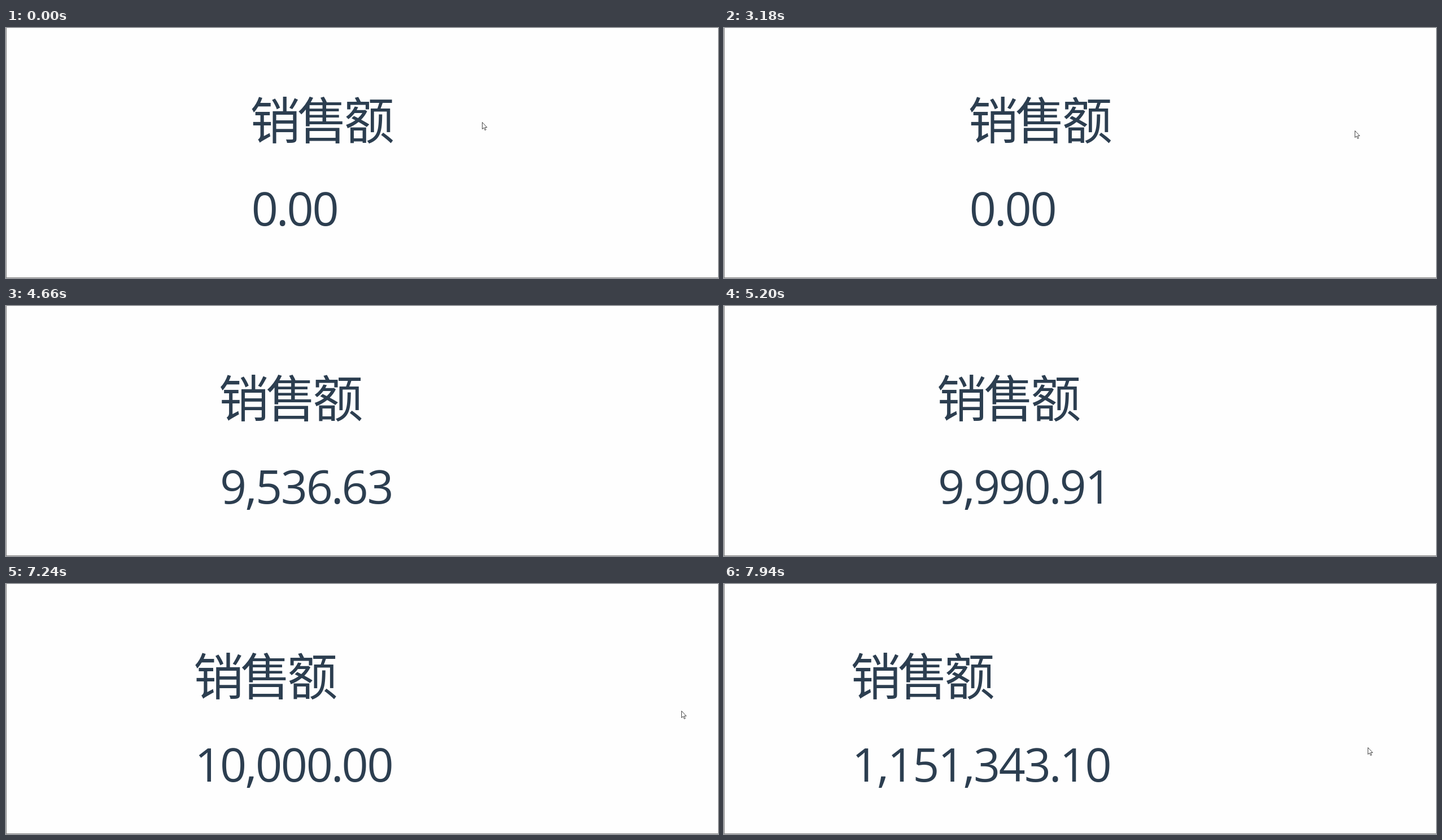
Animation of 1261 by 444 pixels, one loop 8000 ms. Source, as an HTML page with a canvas:

```html
<!DOCTYPE html>
<html lang="zh-CN">
<head>
<meta charset="utf-8">
<title>销售额</title>
<style>
html, body { margin: 0; width: 100%; height: 100%; overflow: hidden; background: #fefefe; }
canvas { display: block; }
</style>
</head>
<body>
<canvas id="stage" width="1261" height="444"></canvas>
<script>
const ctx = document.getElementById('stage').getContext('2d');
const LOOP = 8000;
const EM = 83.2;
const RIGHT = 685.4;
const TITLE = '销售额';
const INK = '#2c3e50';

// The counter refreshes on a regular beat.
const BEAT = 135;
const PHASE = 60;

// First run: the rest up to the goal decays between these moments.
const GOAL = 10000;
const decay = [
  { t: 3705, rest: GOAL },
  { t: 4110, rest: 5959.81 },
  { t: 4650, rest: 463.37 },
  { t: 5190, rest: 9.09 },
  { t: 5730, rest: 0.004 }
];

// Second run: growth from the goal.
const growth = { from: 7485, to: 7890, end: 1151343.1 };

// Each visit of the pointer jumps along its path at even intervals.
const visits = [
  { from: 0, to: 820, path: [[843, 167], [1243, 384], [1222, 404], [1190, 417], [1170, 362], [1195, 306]] },
  { from: 3180, to: 4240, path: [[1117, 182], [1111, 182], [1108, 180], [1103, 176]] },
  { from: 7240, to: LOOP, path: [[1196, 225], [1189, 235], [1140, 290]] }
];

const arrow = [[0, 0], [0, 12], [2.8, 9.5], [4.7, 14], [6.6, 13.2], [4.7, 9], [8.4, 9]];

const geometric = (a, b, u) => a * (b / a) ** u;

function valueAt(time) {
  const t = PHASE + Math.floor((time - PHASE) / BEAT) * BEAT;
  if (t < decay[0].t) return 0;
  if (t > growth.from) {
    const u = Math.min(1, (t - growth.from) / (growth.to - growth.from));
    return geometric(GOAL, growth.end, u);
  }
  const next = decay.findIndex(k => k.t > t);
  if (next < 0) return GOAL;
  const a = decay[next - 1], b = decay[next];
  return GOAL - geometric(a.rest, b.rest, (t - a.t) / (b.t - a.t));
}

function pointerAt(t) {
  const visit = visits.find(v => t >= v.from && t < v.to);
  if (!visit) return null;
  const { from, to, path } = visit;
  return path[Math.floor((t - from) / (to - from) * path.length)];
}

const advance = ch => EM * (/\d/.test(ch) ? 0.539 : /[.,]/.test(ch) ? 0.2168 : 1);

const widthOf = text => [...text].reduce((sum, ch) => sum + advance(ch), 0);

function drawText(text, x, y, font) {
  ctx.font = font;
  ctx.textAlign = 'center';
  ctx.fillStyle = INK;
  for (const ch of text) {
    const w = advance(ch);
    ctx.fillText(ch, x + w / 2, y);
    x += w;
  }
}

function drawPointer([x, y]) {
  ctx.beginPath();
  for (const [dx, dy] of arrow) ctx.lineTo(x + 0.5 + dx, y + 0.5 + dy);
  ctx.closePath();
  ctx.fillStyle = '#fff';
  ctx.fill();
  ctx.strokeStyle = '#333';
  ctx.lineWidth = 0.9;
  ctx.stroke();
}

function draw(t) {
  ctx.fillStyle = '#fefefe';
  ctx.fillRect(0, 0, 1261, 444);
  ctx.fillStyle = '#7c7c7c';
  ctx.fillRect(0, 0, 1, 444);
  ctx.fillRect(0, 443, 1261, 1);

  const value = valueAt(t).toLocaleString('en-US', {
    minimumFractionDigits: 2, maximumFractionDigits: 2
  });
  const left = RIGHT - Math.max(widthOf(TITLE), widthOf(value));
  drawText(TITLE, left - 0.6, 196.8, '89px "Noto Sans CJK SC", "Noto Sans CJK", sans-serif');
  drawText(value, left, 351.3, '82.4px "Open Sans", "Noto Sans", sans-serif');

  const spot = pointerAt(t);
  if (spot) drawPointer(spot);
}

const start = performance.now();
function tick() {
  draw((performance.now() - start) % LOOP);
  requestAnimationFrame(tick);
}
tick();
</script>
</body>
</html>
```
